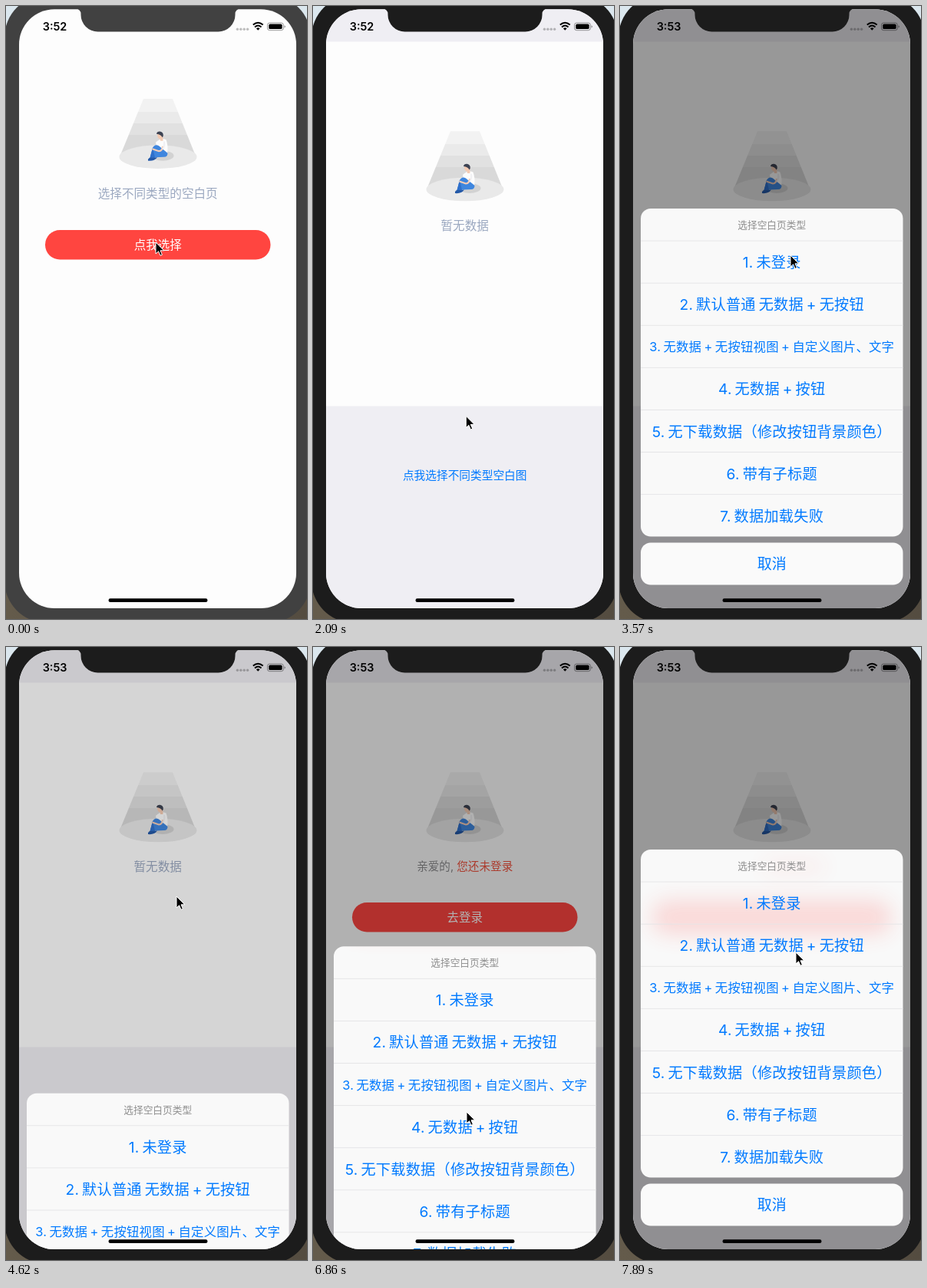
Animation, 392 px wide and 799 px high, one loop 8000 ms. Source, as an HTML page:

```html
<!DOCTYPE html>
<html lang="zh-CN">
<head>
<meta charset="utf-8">
<style>
html, body { margin: 0; height: 100%; overflow: hidden; }
svg { display: block; width: 100vw; height: 100vh; }
text { font-family: Inter, "Noto Sans CJK SC", "Noto Sans CJK", sans-serif; text-anchor: middle; white-space: pre; }
.row { word-spacing: -.09em; letter-spacing: .012em; }
</style>
</head>
<body>
<svg id="stage" viewBox="0 0 392 799" preserveAspectRatio="none"></svg>
<script>
const BLUE = '#007aff', RED = '#ff4540', SLATE = '#9ba8c0';
const LOOP = 8000, TICK = 148.8; // the screen refreshes once per tick
const SHEET_TRAVEL = 521;

// Text centred on (197.7, y)
const label = (str, y, size, fill, extra = '') =>
  `<text x="197.7" y="${y + size * 0.37}" font-size="${size}" fill="${fill}" ${extra}>${str}</text>`;
const box = (x, y, w, h, r, fill, extra = '') =>
  `<rect x="${x}" y="${y}" width="${w}" height="${h}" rx="${r}" fill="${fill}" ${extra}/>`;
const button = (str, y) =>
  box(51, y, 293.5, 38.5, 19.2, RED) + label(str, y + 19, 15.5, '#fff');

const rows = ['1. 未登录', '2. 默认普通 无数据 + 无按钮', '3. 无数据 + 无按钮视图 + 自定义图片、文字',
  '4. 无数据 + 按钮', '5. 无下载数据（修改按钮背景颜色）', '6. 带有子标题', '7. 数据加载失败'];
const sheetRows = rows.map((str, i) => {
  const top = 306 + i * 55.1;
  return box(27, top - 0.4, 341.5, 0.9, 0, '#e4e4e6') +
    label(str, top + 28, i == 2 ? 16.4 : 19.2, BLUE, 'class="row"');
}).join('');

const bands = [['#f2f2f2', 0, 22], ['#eaeaea', 22, 42], ['#e1e1e1', 42, 62], ['#d9d9d9', 62, 100]]
  .map(([c, a, b]) => `<stop offset="${a}%" stop-color="${c}"/><stop offset="${b}%" stop-color="${c}"/>`).join('');

const art = `
  <path d="M179 163.3H217L247.5 239H148Z" fill="url(#beam)"/>
  <ellipse cx="198" cy="239" rx="50.5" ry="15.3" fill="#e9e9e9"/>
  <ellipse cx="204" cy="237.5" rx="14.5" ry="6.5" fill="#d2d2d2"/>
  <path d="M195 220Q202 213.5 208.5 216.5Q211.5 224 210 235H198Z" fill="#fcfcfc"/>
  <path d="M197 209Q197 215 200.5 215.5L201 218H204.5L204 209Z" fill="#f4cbb3"/>
  <path d="M196 209Q196.500 205.600 200.500 205.700Q205.500 206.500 204.700 212L203.500 213.500Q202 209.500 196 209Z" fill="#3d4353"/>
  <path d="M191 227Q194 221.500 199 224.500L210.500 234Q210.500 239 206 239L194 239.500L191 242L187.500 240Z" fill="#3f86de"/>
  <path d="M191 227L194 239.500L191 242L187.500 240Z" fill="#2f70cb"/>
  <path d="M185 242Q187 239 190 240L197 239.500Q193 245 185 244Z" fill="#2459a8"/>
  <path d="M204 225Q204 231 199 231.500L190.500 228.500" fill="none" stroke="#f4cdb8" stroke-width="2.2"/>
  <path d="M206 219Q207 225 204 229" fill="none" stroke="#f0f0f3" stroke-width="2"/>`;

const wifi = `<path d="M321.800 24.600Q328.200 18.900 334.700 24.600M324 27.400Q328.200 23.700 332.500 27.400"
    fill="none" stroke="#000" stroke-width="2"/><path d="M325.900 29.300Q328.200 27.300 330.600 29.300L328.200 31.800Z"/>`;
const dots = [301.4, 305.8, 310.2, 314.6].map(x => `<circle cx="${x}" cy="30.300" r="1.700" fill-opacity=".25"/>`).join('');

stage.innerHTML = `
<defs>
  <linearGradient id="beam" x2="0" y2="1">${bands}</linearGradient>
  <linearGradient id="ground"><stop stop-color="#645b4b"/><stop offset="1" stop-color="#544c40"/></linearGradient>
  <filter id="blur" x="-30%" y="-200%" width="160%" height="500%"><feGaussianBlur stdDeviation="14"/></filter>
  <clipPath id="screen">${box(17, 4.2, 361, 780.8, 46, '#fff')}</clipPath>
  <clipPath id="panel">${box(27, 264, 341.5, 427.5, 13, '#fff')}</clipPath>
  <g id="art">${art}</g>
</defs>
${box(0, 0, 392, 400, 0, '#dbe7ee')}
${box(0, 400, 392, 399, 0, 'url(#ground)')}
${box(-2, -14, 399, 818, 55, '#1c1c1c', 'id="bezel"')}
<g clip-path="url(#screen)">
  ${box(17, 4, 362, 782, 0, '#fdfdfd')}
  <use href="#art" y="-42.300"/>
  ${label('选择不同类型的空白页', 244, 15.6, SLATE)}
  ${button('点我选择', 292)}
  <g id="page">
    ${box(17, 4.2, 362, 790, 0, '#efeef3')}
    ${box(17, 46.5, 362, 475, 0, '#fdfdfd')}
    <use href="#art"/>
    <g id="empty">
      ${label('暂无数据', 286.5, 15.6, SLATE)}
      ${label('点我选择不同类型空白图', 612, 14.7, BLUE)}
    </g>
    <g id="login">
      ${label('亲爱的, <tspan fill="#f4533f">您还未登录</tspan>', 286, 14.6, '#8e8e90')}
      ${button('去登录', 333)}
      ${label(rows[0], 612, 14.4, BLUE)}
    </g>
  </g>
  ${box(17, 4, 362, 782, 0, '#000', 'id="dim"')}
  <g id="sheet">
    ${box(27, 264, 341.5, 427.5, 13, '#f9f9f9')}
    <g clip-path="url(#panel)"><g id="glow">
      ${box(42, 331, 311, 43, 19, RED, 'opacity=".18" filter="url(#blur)"')}
      ${box(187, 276, 80, 20, 4, RED, 'opacity=".06" filter="url(#blur)"')}
    </g></g>
    ${label('选择空白页类型', 285.5, 12.7, '#8f8f8f')}
    ${sheetRows}
    ${box(27, 699.5, 341.5, 55, 13, '#fafafa')}
    ${label('取消', 727, 19, BLUE, 'font-weight="500"')}
  </g>
  <text id="clock" x="63.5" y="31.800" font-size="14.400" font-weight="600"></text>
  ${dots}${wifi}
  ${box(340.5, 22, 20.8, 9.7, 2.8, 'none', 'stroke="#000" stroke-opacity=".4"')}
  ${box(342.2, 23.6, 17.4, 6.5, 1.6, '#000')}
  <path d="M362.600 25.200Q365 26.800 362.600 28.500Z" fill-opacity=".5"/>
  ${box(133.5, 772.3, 129, 4.8, 2.4, '#000')}
</g>
<path id="notch" d="M91 3.500A6.500 6.500 0 0 1 97.500 10V11.400A22 22 0 0 0 119.500 33.400H276.500A22 22 0 0 0 298.500 11.400V10A6.500 6.500 0 0 1 305 3.500Z"/>
<path id="cursor" d="M0 0V15L3.600 11.700L6 17.300L8.400 16.300L6 10.800H10.800Z" stroke="#fff"/>`;

const $ = id => document.getElementById(id);
const shift = (id, x, y) => $(id).setAttribute('transform', `translate(${x} ${y})`);
const show = (id, on) => $(id).setAttribute('display', on ? 'inline' : 'none');

// Critically damped spring: 0 before start, then settles at 1
const spring = (t, start) => {
  const x = Math.max(0, t - start) * 0.01826;
  return 1 - (1 + x) * Math.exp(-x);
};

// Pointer stops: tick, x, y
const stops = [[0, 195, 308], [7, 195, 308], [10, 198, 394], [11, 198, 394], [16, 200, 611], [20, 200, 611],
  [24, 222, 325], [36, 222, 325], [38, 210, 423], [40, 187, 641], [42, 200, 606], [46, 200, 606], [53, 229, 398]];
function pointer(n) {
  const i = Math.max(1, stops.findIndex(s => s[0] >= n));
  const [a, b] = [stops[i - 1], stops[i]];
  const p = (n - a[0]) / (b[0] - a[0]), e = p * p * (3 - 2 * p);
  return [a[1] + (b[1] - a[1]) * e, a[2] + (b[2] - a[2]) * e];
}

function draw(now) {
  const tick = Math.floor((now % LOOP + 5) / TICK), t = tick * TICK;
  const loggedOut = tick >= 34;
  const frame = tick < 3 ? '#414141' : '#1c1c1c';
  $('bezel').setAttribute('fill', frame);
  $('notch').setAttribute('fill', frame);

  shift('page', 0, 781 * (1 - spring(t, 534)));
  show('empty', !loggedOut);
  show('login', loggedOut);

  const open = spring(t, 2719) - spring(t, 4500) + spring(t, 6695);
  const drop = SHEET_TRAVEL * (1 - open);
  shift('sheet', 0, drop);
  shift('glow', 0, -drop);
  show('sheet', open > 0.001);
  show('glow', loggedOut);
  $('dim').setAttribute('opacity', 0.4 * open);

  $('clock').textContent = tick < 22 ? '3:52' : '3:53';
  shift('cursor', ...pointer(tick));
}

const begin = performance.now();
(function loop() {
  draw(performance.now() - begin);
  requestAnimationFrame(loop);
})();
</script>
</body>
</html>
```
